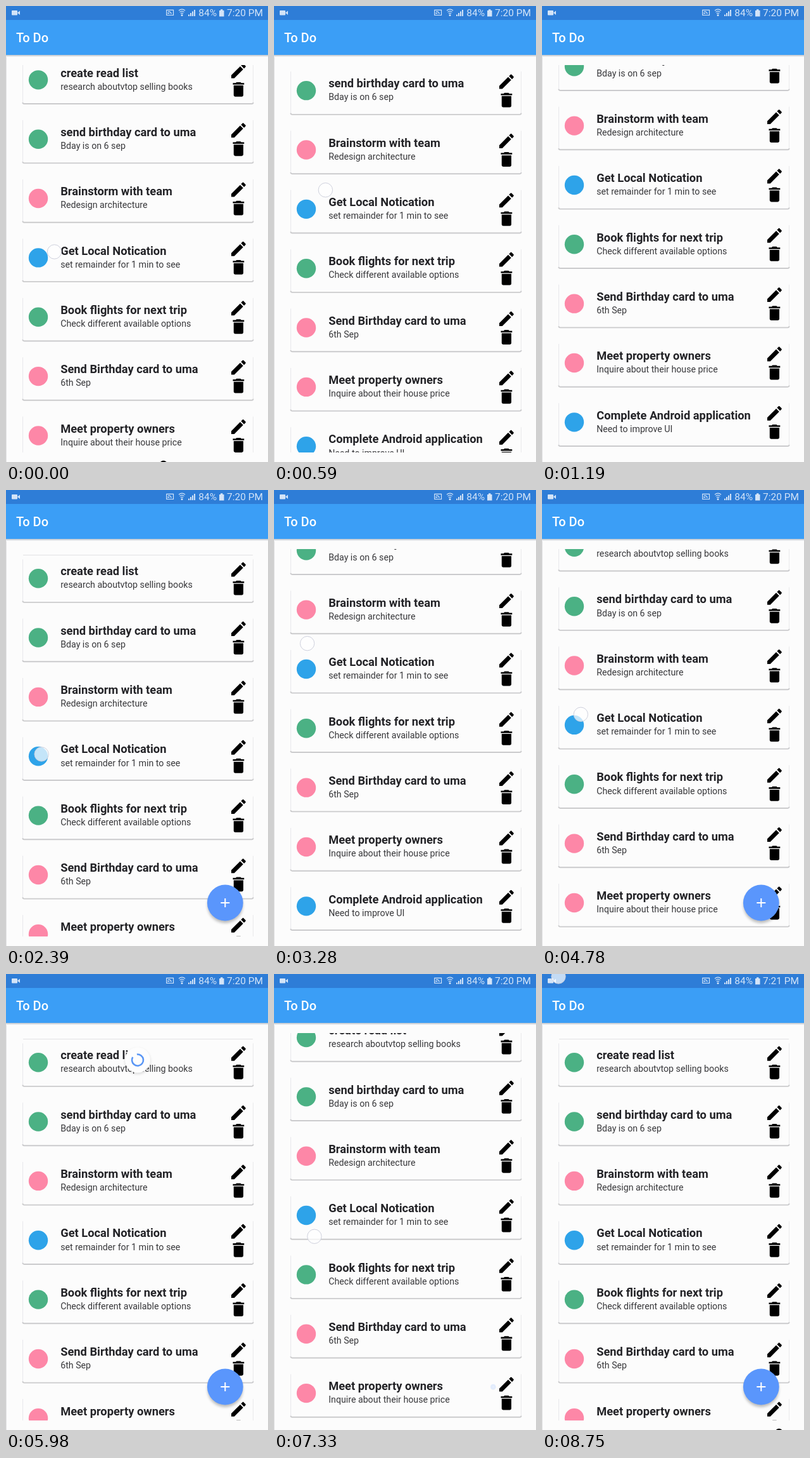
These frames come from a looping animation (414x718 px, 8.85 s). An HTML page:

```html
<!DOCTYPE html>
<html lang="en">
<head>
<meta charset="utf-8">
<title>To Do</title>
<style>
  html, body { margin: 0; width: 100%; height: 100%; overflow: hidden; background: #fcfcfc; }
  svg { display: block; width: 100vw; height: 100vh; font-family: Roboto, sans-serif; }
  .status { font-size: 15.5px; fill: #d3e4f8; }
  .bar { font-size: 20px; font-weight: 500; fill: #fff; }
  .title { font-size: 18.3px; font-weight: 700; fill: #232327; }
  .sub { font-size: 14.2px; fill: #38383b; }
</style>
</head>
<body>
<svg viewBox="0 0 414 718">
  <defs>
    <clipPath id="view"><rect y="93" width="414" height="610"/></clipPath>
    <linearGradient id="drop" x2="0" y2="1">
      <stop stop-color="#bcc2ca"/><stop offset="1" stop-color="#fcfcfc"/>
    </linearGradient>
    <filter id="soft" x="-30%" y="-30%" width="160%" height="160%"><feGaussianBlur stdDeviation="2"/></filter>
    <path id="edit" d="M3 17.25V21h3.75L17.81 9.94l-3.75-3.75zM20.71 7.04c.39-.39.39-1.02 0-1.41l-2.34-2.34c-.39-.39-1.02-.39-1.41 0l-1.83 1.83 3.75 3.75z"/>
    <path id="trash" d="M6 19c0 1.1.9 2 2 2h8c1.1 0 2-.9 2-2V7H6zM19 4h-3.5l-1-1h-5l-1 1H5v2h14z"/>
  </defs>
  <rect width="414" height="718" fill="#fcfcfc"/>
  <path d="M.5 78V718" stroke="#e4e4e6"/>

  <g clip-path="url(#view)">
    <g id="list"></g>
    <g id="spin">
      <circle cy="2" r="20" opacity=".14" filter="url(#soft)"/>
      <circle r="20" fill="#fdfdfd"/>
      <circle id="ring" r="9" fill="none" stroke="#5a96f5" stroke-width="2.6" stroke-dasharray="48 8.55"/>
    </g>
  </g>

  <rect y="77" width="414" height="3.5" fill="url(#drop)"/>
  <rect width="414" height="77" fill="#3b9ef6"/>
  <rect width="414" height="22" fill="#2e7dd7"/>
  <text class="bar" x="16.1" y="57">To Do</text>

  <g fill="#d3e4f8">
    <rect x="9" y="7" width="9" height="7.5" rx="1"/>
    <path d="M18 10.7l4-3.2v6.5z"/>
    <path d="M288 16v-2.5h2V16zM291 16v-5h2v5zM294 16v-7.5h2V16zM297 16V6h2v10z"/>
    <path d="M337 7h2V5.2h3.5V7h2v9.5H337z"/>
    <circle cx="278" cy="14.6" r="1.5"/>
  </g>
  <g fill="none" stroke="#d3e4f8" stroke-width="1.2">
    <path d="M253.7 6.3h10.8v8.2h-10.8zM256 12.5v-1.5q2 0 2 1.5M256 8.7q5 0 5 4"/>
    <path d="M273 7.2q5-4 10 0M274.5 9.6q3.5-2.8 7 0M276 12q2-1.6 4 0"/>
  </g>
  <text class="status" x="304.3" y="16.2">84%</text>
  <text class="status" id="clock" x="349" y="16.2"></text>

  <g id="fab">
    <circle cy="4" r="28" opacity=".25" filter="url(#soft)"/>
    <circle r="28.4" fill="#5a96fc"/>
    <path d="M-7 0H7M0-7V7" stroke="#fff" stroke-width="2"/>
  </g>
  <circle id="blot" r="6" cy="721.8"/>
  <circle id="touch" r="11.2" fill="#fff" fill-opacity=".72" stroke="#c9cbd8" stroke-width=".9"/>
</svg>
<script>
const LOOP = 8850, STEP = 8530 / 57;
const PITCH = 93.35, BOTTOM = 137.3;
const GREEN = '#4bb184', PINK = '#fd87a7', BLUE = '#2ea3e9';
const tasks = [
  [GREEN, 'create read list', 'research aboutvtop selling books'],
  [GREEN, 'send birthday card to uma', 'Bday is on 6 sep'],
  [PINK, 'Brainstorm with team', 'Redesign architecture'],
  [BLUE, 'Get Local Notication', 'set remainder for 1 min to see'],
  [GREEN, 'Book flights for next trip', 'Check different available options'],
  [PINK, 'Send Birthday card to uma', '6th Sep'],
  [PINK, 'Meet property owners', 'Inquire about their house price'],
  [BLUE, 'Complete Android application', 'Need to improve UI'],
];

// Each swipe drags the list to one of its ends; x, y is where the finger is with the list at its top.
const swipes = [
  { start: -551, end: 800, to: BOTTOM, x: 72, y: 416 },
  { start: 1340, end: 1900, to: 0, x: 56, y: 416 },
  { start: 2390, end: 2900, to: BOTTOM, x: 56, y: 416 },
  { start: 3280, end: 5165, to: 0, x: 52.5, y: 416 },
  { start: 6820, end: 7780, to: BOTTOM, x: 58, y: 463 },
  { start: 7930, end: 8500, to: 0, x: 52, y: 416 },
  { start: 8520, end: Infinity, to: 0, x: 26, y: 4 },
];

const el = id => document.getElementById(id);
const set = (id, attrs) => {
  for (const k in attrs) el(id).setAttribute(k, attrs[k]);
};
const show = on => on ? 'inline' : 'none';
const lerp = (a, b, p) => a + (b - a) * p;
const ramp = (t, start, end) => Math.min(1, Math.max(0, (t - start) / (end - start)));
const icon = (id, y) => `<use href="#${id}" transform="translate(367.4 ${y}) scale(1.27) translate(-12 -12)"/>`;

// Each row is drawn around the centre line of its dot.
el('list').innerHTML = tasks.map(([color, title, sub], i) => `
  <g transform="translate(0 ${139.2 + i * PITCH})">
    <path d="M26.5-30V36M390.5-30V36" stroke="#e9e9eb"/>
    ${i ? '' : '<path d="M27-36.7H390" stroke="#e2e2e4"/>'}
    <path d="M26.3 35.5q.2 2.2 2.5 2.2H388.2q2.3 0 2.5-2.2" fill="none" stroke="#cbcbcd" stroke-width="1.9"/>
    <circle cx="51" r="15.2" fill="${color}"/>
    <text class="title" x="86.2" y="-4.8">${title}</text>
    <text class="sub" x="86.2" y="15.3">${sub}</text>
    ${icon('edit', -14)}${icon('trash', 15)}
  </g>`).join('');

function drawSwipe(t) {
  const i = swipes.findLastIndex(s => s.start <= t);
  const { start, end, to, x, y } = swipes[i];
  const from = i ? swipes[i - 1].to : 0;
  const p = ramp(t, start, end);
  const scroll = lerp(from, to, p * p);
  set('list', { transform: `translate(0 ${-scroll})` });
  set('touch', { cx: x + 11 * p, cy: y - 1.27 * scroll, display: show(p < 1) });

  // The button hides on the way down and returns on the way up.
  const fab = lerp(+(from === 0), +(to === 0), ramp(t, start + 330, start + 546));
  set('fab', { transform: `translate(346.3 650) scale(${fab})`, opacity: fab });
}

function drawSpinner(t) {
  const y = lerp(72, 135.5, ramp(t, 5165, 5680));
  const size = 1 - ramp(t, 6050, 6280);
  set('spin', { transform: `translate(208 ${y}) scale(${size})`, display: show(t > 5165 && size > 0) });
  set('ring', { transform: `rotate(${-100 + (t - 5980) * 0.5})` });
}

function draw(time) {
  const t = Math.floor((time + 12) / STEP) * STEP;
  drawSwipe(t);
  drawSpinner(t);
  const first = time < 150;
  set('blot', { cx: first ? 248.8 : 374.5, display: show(first || time >= 8750) });
  el('clock').textContent = t < 7930 ? '7:20 PM' : '7:21 PM';
}

const begin = performance.now();
function loop() {
  draw((performance.now() - begin) % LOOP);
  requestAnimationFrame(loop);
}
loop();
</script>
</body>
</html>
```
